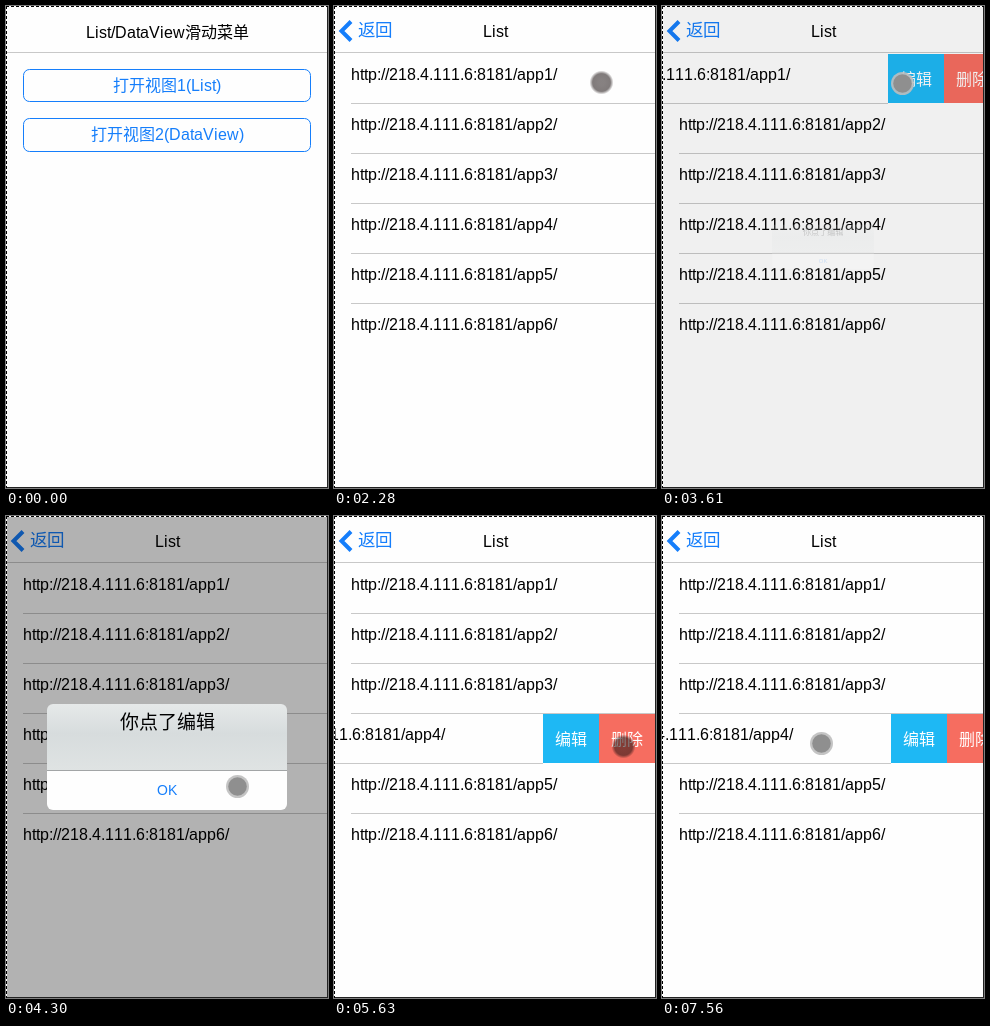
Recreate the animation shown at these times as an HTML page with a canvas. Size 322x482 px, loop 8000 ms.

```html
<!DOCTYPE html>
<html lang="zh-CN">
<head>
<meta charset="utf-8">
<title>List/DataView滑动菜单</title>
<style>
html, body { margin: 0; width: 100%; height: 100%; overflow: hidden; background: #fff; }
canvas { display: block; width: 322px; height: 482px; }
</style>
</head>
<body>
<canvas id="stage"></canvas>
<script>
const W = 322, H = 482, LOOP = 8000, TICK = 70;
const ROW = 50, TOP = 47, CELL = 56;
const FONT = '"Liberation Sans", Arial, "Noto Sans CJK SC", "Noto Sans CJK", sans-serif';
const BLUE = '#157efb', PAPER = '#fefefe', LINE = '#c8c8c8';
const canvas = document.getElementById('stage');
const ctx = canvas.getContext('2d');
const dpr = window.devicePixelRatio || 1;
canvas.width = W * dpr;
canvas.height = H * dpr;

const clamp = v => Math.max(0, Math.min(1, v));
const smooth = v => { v = clamp(v); return v * v * (3 - 2 * v); };
const ramp = (t, a, b) => smooth((t - a) / (b - a));
const between = (t, a, b) => t >= a && t < b;
const show = (t, start, end) => ramp(t, start, start + 260) - ramp(t, end, end + 240);

// Pointer script
const moves = [];
const move = (a, b, x, y, drag = false) => moves.push({ a, b, x, y, drag });
move(390, 850, 205, 85);
move(850, 980, 213, 83);
move(1910, 2060, 267, 76);
move(2240, 2480, 91, 77, true);
move(2600, 3080, 255, 138);
move(3080, 3290, 240, 77);
move(3800, 4240, 231, 270);
move(4560, 4840, 270, 224);
move(4940, 5200, 112, 226, true);
move(5280, 5560, 289, 230);
move(6280, 6650, 219, 271);
move(6800, 7060, 258, 229);
move(7100, 7560, 159, 227, true);

const taps = [[1190, 1400], [3430, 3560], [4400, 4480], [5600, 5950], [6710, 6800]];

const rowShift = (i, t) => {
  if (i === 0) return 2 * CELL * (ramp(t, 2240, 2480) - ramp(t, 3500, 3780));
  if (i === 3) return 2 * CELL * (ramp(t, 4940, 5200) - ramp(t, 5900, 6150)) + 92 * ramp(t, 7100, 7560);
  return 0;
};

// Whole-pixel advances, as in classic hinted text
function text(str, x, y, size, color, { center = true, weight = 400 } = {}) {
  ctx.font = `${weight} ${size}px ${FONT}`;
  ctx.fillStyle = color;
  const chars = [...str].map(c => [c, Math.round(ctx.measureText(c).width)]);
  if (center) x = Math.round(x - chars.reduce((sum, c) => sum + c[1], 0) / 2);
  for (const [c, w] of chars) {
    ctx.fillText(c, x, y);
    x += w;
  }
}

function rect(x, y, w, h, color) {
  ctx.fillStyle = color;
  ctx.fillRect(x, y, w, h);
}

function layer(alpha, paint) {
  ctx.save();
  ctx.globalAlpha *= clamp(alpha);
  paint();
  ctx.restore();
}

function button(label, y, h, pressed) {
  layer(pressed ? 0.5 : 1, () => {
    ctx.beginPath();
    ctx.roundRect(17.5, y + 0.5, 287, h - 1, 6);
    ctx.strokeStyle = BLUE;
    ctx.lineWidth = 1;
    ctx.stroke();
    text(label, 161, y + 22, 16, BLUE);
  });
}

function action(label, x, y, color) {
  rect(x, y, CELL, ROW - 1, color);
  text(label, x + CELL / 2, y + 31, 16, '#fff', { weight: 500 });
}

function row(i, t) {
  const y = TOP + i * ROW, shift = Math.round(rowShift(i, t));
  text(`http://218.4.111.6:8181/app${i + 1}/`, 17 - shift, y + 27, 16, '#000', { center: false });
  if (i < 5) rect(17 - shift, y + ROW, 304, 1, LINE);
  if (shift > 0) {
    action('编辑', 321 - shift, y + 1, '#1eb8f4');
    action('删除', 321 - shift + CELL, y + 1, '#f66d60');
  }
}

function backButton() {
  ctx.beginPath();
  ctx.moveTo(17, 15.5);
  ctx.lineTo(7.5, 25);
  ctx.lineTo(17, 34.5);
  ctx.lineWidth = 4;
  ctx.strokeStyle = BLUE;
  ctx.stroke();
  text('返回', 24, 30, 17.5, BLUE, { center: false, weight: 300 });
}

function pages(t) {
  const e = ramp(t, 1348, 1640);
  if (e < 1) {
    layer(1 - e * e, () => text('List/DataView滑动菜单', 161 - 14 * e, 32, 16, '#000'));
    ctx.save();
    ctx.translate(-Math.round(320 * e), 0);
    button('打开视图1(List)', 63, 33, between(t, ...taps[0]));
    button('打开视图2(DataView)', 112, 34, false);
    ctx.restore();
  }
  if (e > 0) {
    layer(e, () => text('List', 161 + 163 * (1 - e), 31, 16, '#000'));
    layer(e * e, () => {
      ctx.translate(60 * (1 - e), 0);
      backButton();
    });
    ctx.save();
    ctx.translate(Math.round(320 * (1 - e)), 0);
    for (let i = 0; i < 6; i++) row(i, t);
    ctx.restore();
  }
  rect(1, 46, 320, 1, LINE);
}

function dialog(message, p) {
  if (p <= 0) return;
  rect(0, 0, W, H, `rgba(0,0,0,${0.3 * p})`);
  layer(p, () => {
    const s = 0.3 + 0.7 * p;
    ctx.translate(161, 241);
    ctx.scale(s, s);
    ctx.translate(-161, -241);
    ctx.beginPath();
    ctx.roundRect(41, 188, 240, 106, 6);
    ctx.clip();
    const g = ctx.createLinearGradient(0, 188, 0, 254);
    g.addColorStop(0, '#e6e9e9');
    g.addColorStop(0.45, '#d7dcdd');
    g.addColorStop(1, '#dfe3e3');
    rect(41, 188, 240, 66, g);
    rect(41, 254, 240, 1, '#a2a5a6');
    rect(41, 255, 240, 39, PAPER);
    text(message, 161.5, 213, 19, '#000', { weight: 300 });
    text('OK', 161, 279, 14, BLUE);
  });
}

function disc(x, y, r, color) {
  ctx.beginPath();
  ctx.arc(x, y, r, 0, Math.PI * 2);
  ctx.fillStyle = color;
  ctx.fill();
}

function pointer(t) {
  if (t < moves[0].a) return;
  let x = 293, y = 177;
  for (const m of moves) {
    const u = ramp(t, m.a, m.b);
    x += (m.x - x) * u;
    y += (m.y - y) * u;
  }
  x += 0.5;
  y += 0.5;
  const pressed = taps.some(tap => between(t, ...tap)) ||
    moves.some(m => m.drag && between(t, m.a, m.b));
  if (pressed) {
    const g = ctx.createRadialGradient(x, y, 3, x, y, 12);
    g.addColorStop(0, 'rgba(25,15,15,.52)');
    g.addColorStop(0.65, 'rgba(25,15,15,.55)');
    g.addColorStop(1, 'rgba(25,15,15,0)');
    disc(x, y, 12, g);
  } else {
    disc(x, y, 11.5, 'rgba(190,190,190,.9)');
    disc(x, y, 9.3, '#8f8f8f');
  }
}

function border() {
  rect(W - 1, 0, 1, H, '#222');
  rect(0, H - 1, W, 1, '#222');
  rect(0, 0, W - 1, 1, '#fff');
  rect(0, 0, 1, H - 1, '#fff');
  for (let d = 0; d < H; d += 5) {
    rect(d, 0, 3, 1, '#000');
    rect(0, d, 1, 3, '#000');
  }
}

function draw(now) {
  const t = Math.floor((now % LOOP) / TICK) * TICK;
  ctx.setTransform(dpr, 0, 0, dpr, 0, 0);
  rect(0, 0, W, H, PAPER);
  pages(t);
  dialog('你点了编辑', show(t, 3500, 4440));
  dialog('你点了删除', show(t, 5890, 6770));
  pointer(t);
  border();
}

const start = performance.now();
function tick() {
  draw(performance.now() - start);
  requestAnimationFrame(tick);
}
tick();
</script>
</body>
</html>
```
